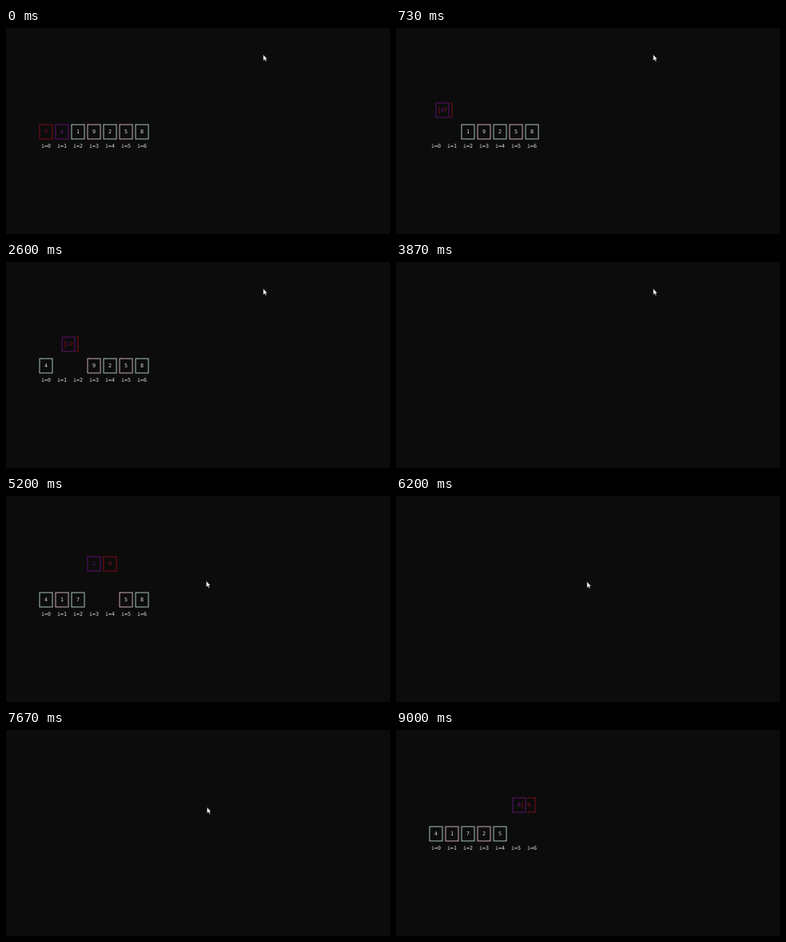
An HTML page that plays this animation: 480 px wide and 258 px high, repeating every 9070 ms.

```html
<!DOCTYPE html>
<html lang="en">
<head>
<meta charset="utf-8">
<title>Bubble sort</title>
<style>
  html, body { margin: 0; width: 100%; height: 100%; overflow: hidden; background: #0c0c0c; }
  svg { display: block; width: 480px; height: 258px; }
  text { font: 6.65px "DejaVu Sans Mono", monospace; text-anchor: middle; fill: currentColor; }
  .label { text-anchor: start; color: #dcdcdc; }
  .cover { fill: #0c0c0c; }
  .line { fill: none; stroke: var(--line); }
  .even { color: #dcdcdc; --line: #a8c2bb; }
  .odd { color: #dcdcdc; --line: #c6acb1; }
  .red { color: #95121f; --line: #7c0d1a; }
  .purple { color: #66177a; --line: #5b1268; }
</style>
</head>
<body>
<svg viewBox="0 0 480 258">
  <g id="board"></g>
  <path id="mouse" d="M0 0V7.6L1.8 6.1L3 8.7L4.2 8.2L3.1 5.6H5.2Z" fill="#fff" stroke="#000" stroke-width=".4"/>
</svg>
<script>
const LOOP = 9070, FRAME = 200 / 3;
const CELL_W = 4, CELL_H = 9, PITCH = 20, LEFT = 40, TOP = 116.5;
const START = [7, 4, 1, 9, 2, 5, 8];
const MARKS = START.length * 4; // a box and three label characters per item

// Key points in frames: the program's ticks slow down near the end.
const CLOCK = [[0, -1], [29, 86], [31, 94], [38, 116], [43, 135], [45, 143]];
const MOUSE = [
  [0, 321.5, 33.3], [70, 321.5, 33.3], [78, 250.3, 106.5], [81, 238.7, 107.3],
  [114, 238.7, 107.3], [115, 251.2, 96.7], [127, 405, 7]
];

function along(points, at, column = 1) {
  const i = points.findIndex(p => p[0] > at);
  if (i < 0) return points[points.length - 1][column];
  const a = points[i - 1], b = points[i];
  return a[column] + (b[column] - a[column]) * (at - a[0]) / (b[0] - a[0]);
}

// How much of the board is visible one frame before it is complete.
function halfDrawn(tick) {
  const part = 0.5 - Math.cos((tick - 3) * Math.PI * 2 / 9);
  return Math.round(MARKS * Math.min(1, Math.max(0, part)));
}

// Steps of a comparison: 0 compare, 1-5 move apart and up, 6 placed.
function bubblePass() {
  const states = [], items = [...START];
  let tick = 0;
  const show = (at, step, ticks) => {
    const full = Math.round(along(CLOCK, tick) + 0.2);
    states.push({ at, step, full, seen: halfDrawn(tick), items: [...items] });
    tick += ticks;
  };
  for (let at = 0; at < items.length - 1; at++) {
    show(at, 0, 2);
    if (items[at] <= items[at + 1]) continue;
    for (let step = 1; step < 6; step++) show(at, step, 1);
    [items[at], items[at + 1]] = [items[at + 1], items[at]];
    show(at, 6, 2);
  }
  return states;
}

const states = bubblePass();
const board = document.getElementById('board');
const mouse = document.getElementById('mouse');

function add(parent, tag, attrs) {
  const el = document.createElementNS('http://www.w3.org/2000/svg', tag);
  for (const key in attrs) el.setAttribute(key, attrs[key]);
  return parent.appendChild(el);
}

// The box covers what lies below it, except under its two blank cells.
function makeBox() {
  const g = add(board, 'g', {});
  const cover = (x, y, width) => add(g, 'rect', { class: 'cover', x, y, width, height: CELL_H });
  cover(0, 0, PITCH);
  cover(0, 2 * CELL_H, PITCH);
  for (const x of [0, 8, 16]) cover(x, CELL_H, CELL_W);
  add(g, 'rect', { class: 'line', x: 2, y: 4.5, width: 16, height: 18 });
  const digit = add(g, 'text', { x: 10, y: 15.8 });
  return { g, digit };
}

const boxes = START.map(makeBox);
const labels = START.map((_, i) =>
  add(board, 'text', { class: 'label', x: LEFT + i * PITCH + CELL_W, y: 150 }));

function drawBoard(frame) {
  let n = states.length - 1;
  while (n > 0 && states[n].full - 1 > frame) n--;
  const { at, step, full, items } = states[n];
  const seen = frame < full ? states[n].seen : MARKS;
  const shift = step < 6 ? step : 0;

  items.forEach((value, i) => {
    const { g, digit } = boxes[i];
    const dir = i === at ? 1 : i === at + 1 ? -1 : 0;
    const x = LEFT + i * PITCH + dir * shift * CELL_W;
    const y = TOP - (dir ? shift * CELL_H : 0);
    g.setAttribute('transform', `translate(${x} ${y})`);
    g.setAttribute('class', dir > 0 ? 'red' : dir < 0 ? 'purple' : i % 2 ? 'odd' : 'even');
    g.setAttribute('visibility', seen > i * 4 ? 'visible' : 'hidden');
    digit.textContent = value;
    labels[i].textContent = `i=${i}`.slice(0, Math.max(0, seen - i * 4 - 1));
  });
}

function drawMouse(frame) {
  const x = along(MOUSE, frame), y = along(MOUSE, frame, 2);
  mouse.setAttribute('transform', `translate(${x} ${y})`);
  mouse.setAttribute('visibility', frame > 127 ? 'hidden' : 'visible');
}

const begin = performance.now();
function play() {
  const t = (performance.now() - begin) % LOOP;
  const frame = Math.floor(t / FRAME + 0.1);
  drawBoard(frame);
  drawMouse(frame);
  requestAnimationFrame(play);
}
play();
</script>
</body>
</html>
```
